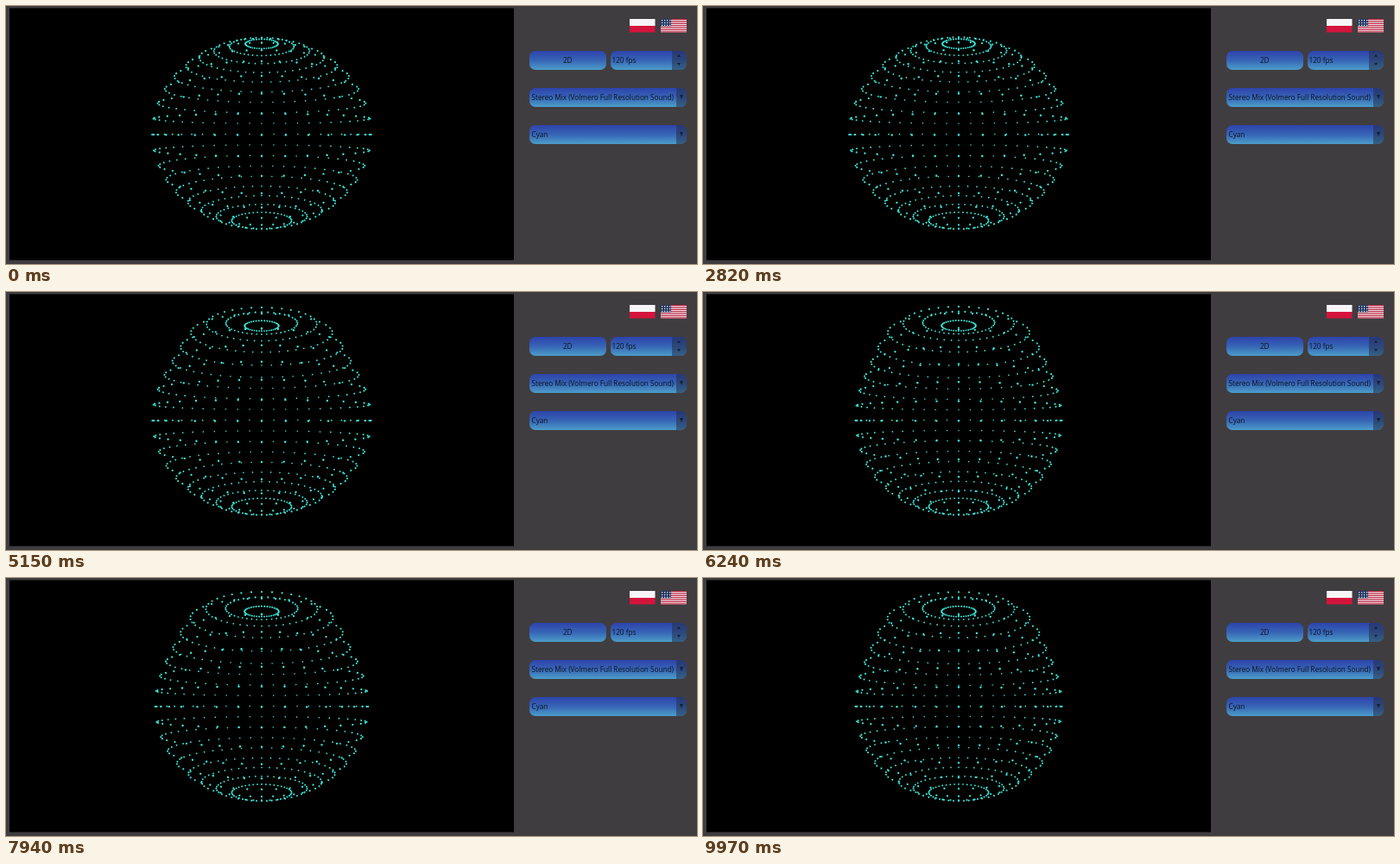
Animation of 800x299 px, one loop 10000 ms. Source, as an HTML page with a canvas:

```html
<!DOCTYPE html>
<html lang="en">
<head>
<meta charset="utf-8">
<title>Sphere visualizer</title>
<style>
html, body { margin: 0; width: 100%; height: 100%; overflow: hidden; background: #403d40; }
canvas { position: absolute; left: 0; top: 0; }
.box {
  position: absolute; left: 605.5px; width: 182px; height: 22px;
  box-sizing: border-box; overflow: hidden; border-radius: 7px; padding-left: 3px;
  background: linear-gradient(#2d43ab, #3765b6 50%, #4c9dc9);
  font: 8.2px/22px "Open Sans", "Noto Sans", sans-serif; color: #0c1420; white-space: nowrap;
}
.box i { position: absolute; right: 0; top: 0; bottom: 0; width: 12px; background: rgba(35, 48, 75, .55); }
.box i::after {
  content: ""; position: absolute; left: 4px; top: 8px;
  border: 2.5px solid transparent; border-top: 5px solid #142036; border-bottom: 0;
}
.box i.spin { width: 17px; }
.spin::before {
  content: ""; position: absolute; left: 6px; top: 4px;
  border: 2.5px solid transparent; border-bottom: 3px solid #142036; border-top: 0;
}
.box i.spin::after { left: 6px; top: 14px; border-top-width: 3px; }
</style>
</head>
<body>
<canvas id="stage" width="800" height="299"></canvas>
<div class="box" style="top:52px;width:89.5px;padding:0;text-align:center">2D</div>
<div class="box" style="top:52px;left:699.5px;width:88px;padding-left:2px">120 fps<i class="spin"></i></div>
<div class="box" style="top:95px">Stereo Mix (Volmero Full Resolution Sound)<i></i></div>
<div class="box" style="top:138px">Cyan<i></i></div>
<script>
const ctx = document.getElementById("stage").getContext("2d");
const LOOP = 10000, STEP = 30, TURN = Math.PI * 2;
const CENTER = { x: 296, y: 147.6 };
const FOCUS = 359, SQUASH = 0.875, DISTANCE = 3;
const COLUMNS = 40, RINGS = 18, RING_ANGLE = 9.07 * Math.PI / 180;

// crown: swelling of the upper rings; waist: change of the middle radius.
const BEATS = [
  { t: 0, crown: 0, waist: 0 },
  { t: 1090, crown: 0.01, waist: 0.01 },
  { t: 2200, crown: 0.08, waist: 0 },
  { t: 2820, crown: 0.005, waist: 0 },
  { t: 3450, crown: 0.15, waist: 0.02 },
  { t: 4000, crown: 0.07, waist: -0.005 },
  { t: 5000, crown: 0.15, waist: 0 },
  { t: 6240, crown: 0.16, waist: -0.053 },
  { t: 7940, crown: 0.165, waist: -0.025 },
  { t: 9970, crown: 0.165, waist: -0.053 }
];

const mix = (a, b, u) => a + (b - a) * u;
const ease = u => u * u * (3 - 2 * u);
const bell = (x, middle, width) => Math.exp(-(((x - middle) / width) ** 2));

function rect(x, y, w, h, color) {
  ctx.fillStyle = color;
  ctx.fillRect(x, y, w, h);
}

function poseAt(t) {
  const next = Math.max(1, BEATS.findIndex(beat => beat.t >= t));
  const a = BEATS[next - 1], b = BEATS[next];
  const u = ease((t - a.t) / (b.t - a.t));
  return { crown: mix(a.crown, b.crown, u), waist: mix(a.waist, b.waist, u) };
}

function drawPoint(x, y, z) {
  const scale = FOCUS / (DISTANCE - z);
  const nearness = Math.max(0, (scale - 88) / 92);
  const size = 1.3 + 1.2 * Math.sqrt(nearness);
  ctx.beginPath();
  ctx.arc(CENTER.x + x * scale, CENTER.y - y * scale * SQUASH, size / 2, 0, TURN);
  ctx.fill();
}

function drawSphere(t) {
  const { crown, waist } = poseAt(t);
  ctx.fillStyle = "#3be8d8";
  for (let ring = 0; ring <= RINGS; ring++) {
    const radius = 1 + crown * bell(ring, 3.2, 2) + waist * bell(ring, 10, 4);
    const polar = ring * RING_ANGLE;
    const flat = radius * Math.sin(polar), height = radius * Math.cos(polar);
    const count = ring ? COLUMNS : 1;
    for (let c = 0; c < count; c++) {
      const turn = c / COLUMNS * TURN;
      drawPoint(flat * Math.sin(turn), height, flat * Math.cos(turn));
    }
  }
}

function drawFlags() {
  rect(722, 15, 29.5, 8, "#f7f5f7");
  rect(722, 23, 29.5, 7.5, "#d5143c");
  const stripe = 15.5 / 13;
  rect(758, 15, 30, 15.5, "#f0e9ec");
  for (let i = 0; i < 13; i += 2) rect(758, 15 + i * stripe, 30, stripe, "#bd2340");
  rect(758, 15, 12, stripe * 7, "#22355f");
  for (let row = 0; row < 3; row++)
    for (let col = 0; col < 4; col++)
      rect(759 + col * 3, 16 + row * 2.8, 1.3, 1.3, "#dfe4ee");
}

function draw(elapsed) {
  const t = Math.floor((elapsed % LOOP) / STEP) * STEP;
  rect(0, 0, 800, 299, "#403d40");
  rect(4, 2.5, 584, 292, "#000");
  drawSphere(Math.min(t, BEATS[BEATS.length - 1].t));
  drawFlags();
}

const start = performance.now();
function loop() {
  draw(performance.now() - start);
  requestAnimationFrame(loop);
}
loop();
</script>
</body>
</html>
```
